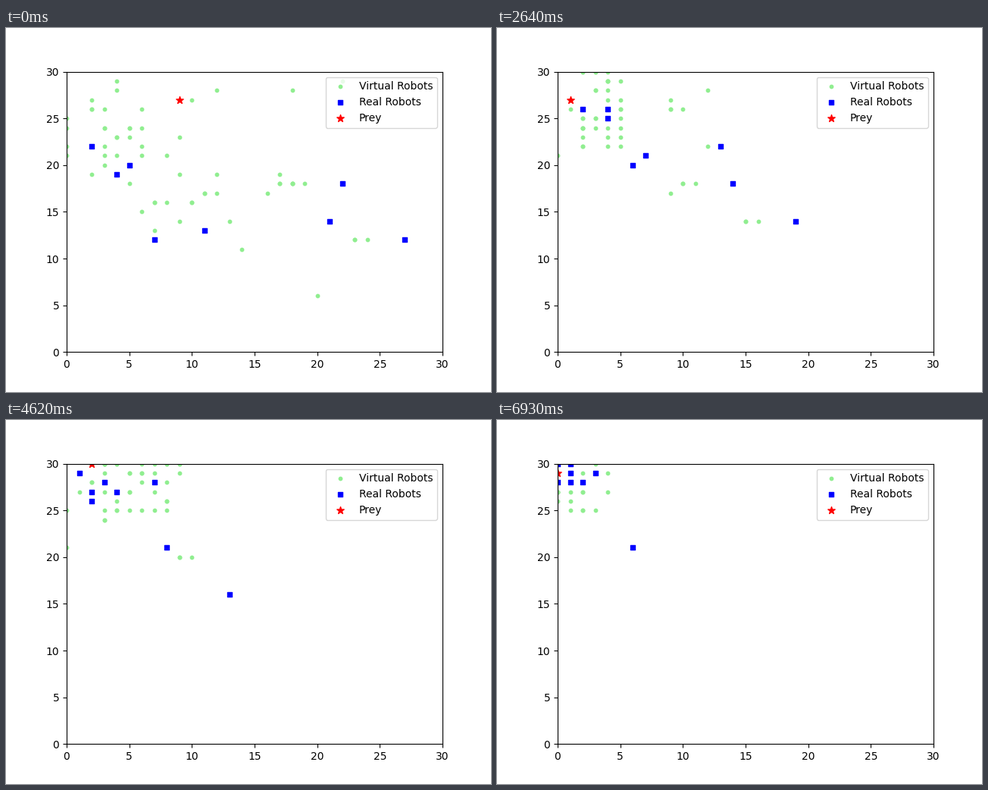
These frames come from a looping animation (640x480 px, 8920 ms). A matplotlib script:

```python
import math
import random

import matplotlib.pyplot as plt
from matplotlib.animation import FuncAnimation

STEP_MS, LAST_STEP = 330, 21
TICK_MS, LOOP_MS = 40, 8920
SIZE = 30
REACH = 4

PREY_KEYS = [0, 9, 12, 16, 20, 21]
PREY = [(9, 27), (0, 27), (0, 30), (4, 30), (0, 30), (0, 29)]

# One route per real robot, front of the pack first.
ROBOT_KEYS = [0, 6, 12, 16, 21]
ROBOTS = [
    [(2, 22), (4, 26), (2, 28), (4, 29), (1, 29)],
    [(5, 20), (3, 25), (0, 29), (2, 29), (0, 30)],
    [(4, 19), (4, 24), (2, 27), (2, 28), (0, 28)],
    [(7, 12), (7, 18), (2, 24), (3, 28), (1, 28)],
    [(11, 13), (8, 19), (3, 25), (5, 29), (3, 29)],
    [(21, 14), (15, 20), (9, 26), (5, 30), (1, 30)],
    [(22, 18), (16, 18), (10, 19), (6, 23), (2, 28)],
    [(27, 12), (21, 14), (15, 15), (11, 17), (6, 21)],
]

# Idle virtual robots: x, y and the last step they are seen.
IDLE = [(0, 21, 20), (4, 29, 9), (4, 28, 7), (12, 28, 9), (9, 23, 7),
        (10, 27, 5), (18, 28, 3), (22, 29, 5), (14, 11, 5), (20, 6, 0)]


def segment(keys, points, step):
    """Start, end, steps done and length of the stretch at this step."""
    i = max(j for j in range(len(keys) - 1) if keys[j] <= step)
    return points[i], points[i + 1], step - keys[i], keys[i + 1] - keys[i]


def along(keys, points, step):
    a, b, k, n = segment(keys, points, step)
    return tuple(p + int((q - p) * k / n) for p, q in zip(a, b))


def heading(keys, points, step):
    a, b, _, n = segment(keys, points, step)
    return tuple(math.floor((q - p) / n + 0.5) for p, q in zip(a, b))


def clamp(v):
    return min(SIZE, max(0, v))


def make_flock(rng, count):
    """Three scouts at the lead point, the rest trailing loosely behind it."""
    scouts = [(0, 0), (0, 0), (1, 0)]
    return scouts + [(rng.uniform(-2, 3), rng.uniform(-4, 2))
                     for _ in range(count - len(scouts))]


rng = random.Random(7)
FLOCKS = [make_flock(rng, 10 - i) for i in range(len(ROBOTS))]


def virtual_at(step):
    cells = [(x, y) for x, y, last in IDLE if step <= last]
    spread = 1.3 - 0.6 * step / LAST_STEP
    for route, flock in zip(ROBOTS, FLOCKS):
        x, y = along(ROBOT_KEYS, route, step)
        hx, hy = heading(ROBOT_KEYS, route, step)
        cells += [(clamp(x + REACH * hx + round(dx * spread)),
                   clamp(y + REACH * hy + round(dy * spread)))
                  for dx, dy in flock]
    return cells


def state(step):
    return (virtual_at(step),
            [along(ROBOT_KEYS, route, step) for route in ROBOTS],
            [along(PREY_KEYS, PREY, step)])


STATES = [state(s) for s in range(LAST_STEP + 1)]

fig, ax = plt.subplots(figsize=(6.4, 4.8), dpi=100)
ax.set_xlim(0, SIZE)
ax.set_ylim(0, SIZE)

styles = [("lightgreen", "o", 10, "Virtual Robots"),
          ("blue", "s", 20, "Real Robots"),
          ("red", "*", 50, "Prey")]
layers = [ax.scatter(*zip(*cells), color=color, marker=marker, s=size, label=label)
          for cells, (color, marker, size, label) in zip(STATES[0], styles)]
ax.legend(loc="upper right")


def update(tick):
    step = min(LAST_STEP, (tick * TICK_MS + TICK_MS - 1) // STEP_MS)
    for layer, cells in zip(layers, STATES[step]):
        layer.set_offsets(cells)
    return layers


anim = FuncAnimation(fig, update, frames=LOOP_MS // TICK_MS, interval=TICK_MS,
                     repeat=True, repeat_delay=0)
plt.show()
```
